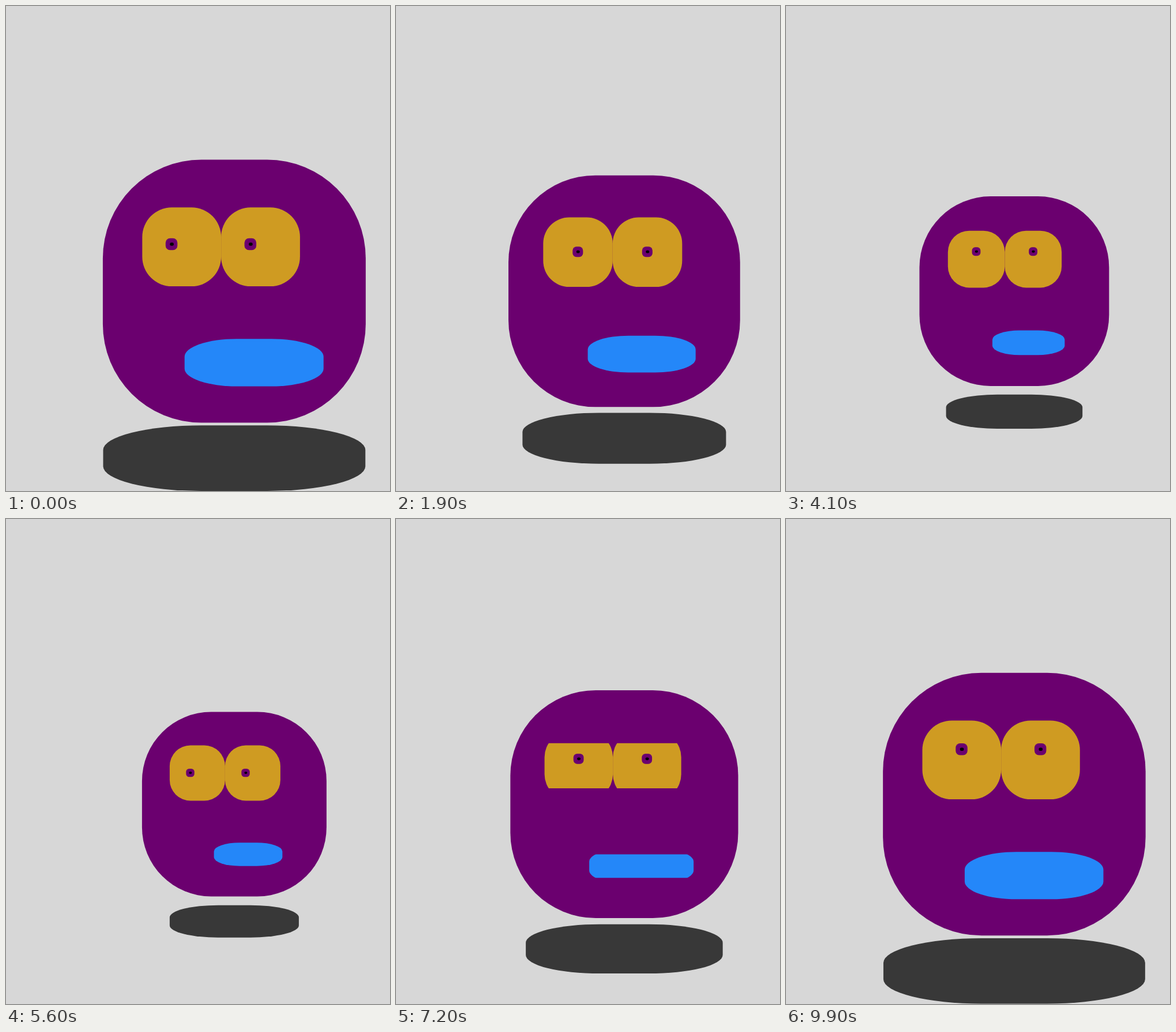
Write an HTML page with a canvas that moves like this. It is 666 px wide and 841 px high and loops after 10000 ms.

```html
<!DOCTYPE html>
<html>
<head>
<meta charset="utf-8">
<style>
html, body { margin: 0; width: 100%; height: 100%; overflow: hidden; background: #d7d7d7; }
canvas { display: block; }
</style>
</head>
<body>
<canvas width="666" height="841"></canvas>
<script>
const ctx = document.querySelector('canvas').getContext('2d');
const LOOP = 10, STEP = 0.1, LOOK = 6.034, MOVE = 0.3;
const CX = 395.9, CY = 494.5, SIZE = 457.14, ROUND = 0.375;
const PURPLE = '#6b006f';

// Gaze moves: start time, then the offset looked at, in eye widths.
const gaze = [
  [0, -.129, -.135],
  [.58, -.002, -.135],
  [1.162, -.002, -.005],
  [2.36, -.002, -.135],
  [4.2, -.002, -.005],
  [4.8, -.129, -.005]
];

// The CSS "ease" curve, solved by bisection.
function ease(x) {
  if (x <= 0) return 0;
  if (x >= 1) return 1;
  let lo = 0, hi = 1, p;
  for (let i = 0; i < 24; i++) {
    p = (lo + hi) / 2;
    if (.75 * p * (1 - p) + p ** 3 < x) lo = p; else hi = p;
  }
  return .3 * p * (1 - p) ** 2 + 3 * p * p * (1 - p) + p ** 3;
}

function scaleAt(t) {
  if (t >= .66 && t < 5.61) return 1 - .3 * ease((t - .66) / 5);
  const since = (t < .66 ? t + LOOP : t) - 5.61;
  return .7 + .3 * ease(since / 5);
}

function gazeAt(u) {
  let [, x, y] = gaze[gaze.length - 1];
  for (const [start, toX, toY] of gaze) {
    const k = ease((u - start) / MOVE);
    x += (toX - x) * k;
    y += (toY - y) * k;
  }
  return [x, y];
}

function opennessAt(u) {
  return 1 - ease((u - 1.15) / MOVE) + ease((u - 1.45) / MOVE);
}

// Rounded box around a centre point.
function blob(x, y, w, h, color) {
  ctx.fillStyle = color;
  ctx.beginPath();
  ctx.roundRect(x - w / 2, y - h / 2, w, h, { x: w * ROUND, y: h * ROUND });
  ctx.fill();
}

// Draws through a horizontal slit, as half-closed lids would leave.
function slit(x, y, w, h, open, paint) {
  if (open > .999) return paint();
  ctx.save();
  ctx.beginPath();
  ctx.rect(x - w, y - h * open / 2, w * 2, h * open);
  ctx.clip();
  paint();
  ctx.restore();
}

function draw(t) {
  const s = scaleAt(t), size = SIZE * s;
  const u = (t + .05) % LOOK, open = opennessAt(u);
  const [gx, gy] = gazeAt(u);

  ctx.fillStyle = '#d7d7d7';
  ctx.fillRect(0, 0, 666, 841);
  blob(CX, CY + 290.3 * s, size * s, size * s / 4, '#383838');
  blob(CX, CY, size, size, PURPLE);

  const eye = size * .3, eyeY = CY - size * .1685;
  for (const side of [-.2, .1]) {
    const eyeX = CX + size * side;
    slit(eyeX, eyeY, eye, eye, open, () => {
      const px = eyeX + gx * eye, py = eyeY + gy * eye;
      blob(eyeX, eyeY, eye, eye, '#cf9b22');
      blob(px, py, eye * .15, eye * .15, PURPLE);
      blob(px + eye * .004, py, eye * .048, eye * .04, '#000');
    });
  }

  const mouthX = CX + size * .0753, mouthY = CY + size * .2717;
  const mouthW = size * s * .53, mouthH = size * s * .181;
  slit(mouthX, mouthY, mouthW, mouthH, open, () =>
    blob(mouthX, mouthY, mouthW, mouthH, '#2487f9'));
}

const begin = performance.now();
function tick() {
  const t = (performance.now() - begin) / 1000 % LOOP;
  draw(Math.floor(t / STEP + 1e-6) * STEP);
  requestAnimationFrame(tick);
}
tick();
</script>
</body>
</html>
```
